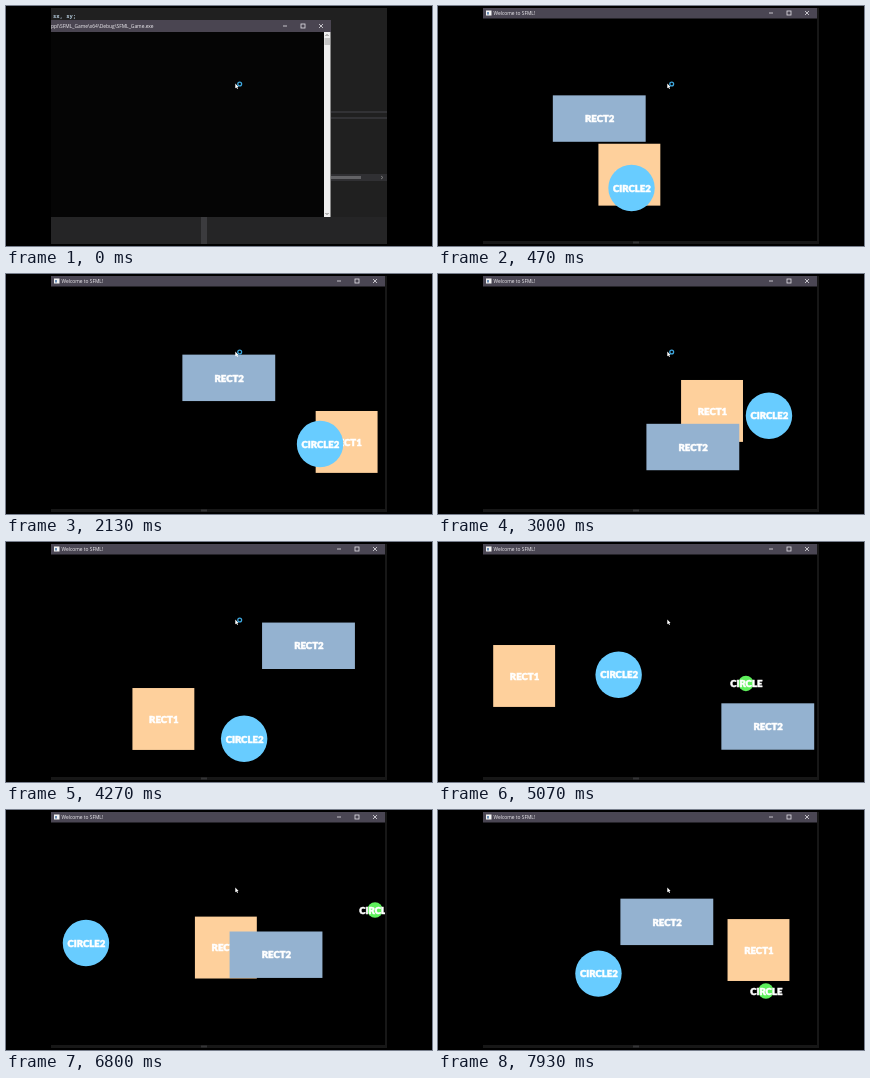
Write an HTML page with a canvas that moves like this. It is 426 by 240 pixels and loops after 8000 ms.

```html
<!DOCTYPE html>
<html lang="en">
<head>
<meta charset="utf-8">
<title>Bouncing shapes</title>
<style>
  html, body { margin: 0; width: 100%; height: 100%; overflow: hidden; background: #000; }
  canvas { display: block; width: 100vw; height: 100vh; }
</style>
</head>
<body>
<canvas id="stage" width="426" height="240"></canvas>
<script>
const ctx = document.getElementById('stage').getContext('2d');

const LOOP = 8000, STEP = LOOP / 120;
const WINDOW_OPENS = 0.19, BUSY_ENDS = 5;
const UNIT = 0.3095;                 // stage pixels per world unit
const WORLD = { x: 45, y: 12.5, w: 1073, h: 720 };

// Timing marks shared by the travel (unfolded x) and hop (phase) tracks.
const MARKS = [0, 1.2, 3, 4.267, 5.8, 6.8, 7.933];
const shapes = [
  { label: 'CIRCLE', round: true, w: 50, h: 50, color: '#5ef05c', apex: 422,
    travel: [228, 369, 580, 729, 912, 1024, 1157],
    hop: [-0.006, 0.538, 1.354, 1.929, 2.624, 3.077, 3.599] },
  { label: 'RECT1', w: 200, h: 200, color: '#fed09c', apex: 234,
    travel: [238, 585, 1106, 1483, 1924, 2211, 2536],
    hop: [-0.924, -0.204, 0.869, 1.606, 2.521, 3.139, 3.833] },
  { label: 'CIRCLE2', round: true, w: 150, h: 150, color: '#68ccff', apex: 256.5,
    travel: [296, 576, 997, 1297, 1653, 1884, 2144],
    hop: [-0.875, -0.184, 0.832, 1.551, 2.429, 3.031, 3.688] },
  { label: 'RECT2', w: 300, h: 150, color: '#94b2d0', apex: 351,
    travel: [170, 313, 528, 682, 851, 969, 1102],
    hop: [-1.088, -0.49, 0.4, 1.026, 1.804, 2.308, 2.861] }
];

function along(track, t) {
  let i = 1;
  while (i < MARKS.length - 1 && t > MARKS[i]) i++;
  const k = (t - MARKS[i - 1]) / (MARKS[i] - MARKS[i - 1]);
  return track[i - 1] + (track[i] - track[i - 1]) * k;
}

function fold(distance, span) {
  const d = distance % (2 * span);
  return d > span ? 2 * span - d : d;
}

function box(x, y, w, h, color) {
  ctx.fillStyle = color;
  ctx.fillRect(x, y, w, h);
}

function write(text, x, y, font, color, align = 'left') {
  ctx.font = font;
  ctx.fillStyle = color;
  ctx.textAlign = align;
  ctx.textBaseline = 'alphabetic';
  ctx.fillText(text, x, y);
}

function line(points, color, width = 0.8) {
  ctx.beginPath();
  points.forEach(([x, y]) => ctx.lineTo(x, y));
  ctx.strokeStyle = color;
  ctx.lineWidth = width;
  ctx.stroke();
}

function windowButtons(x, y) {
  const c = '#e4e2e8';
  line([[x - 2, y], [x + 2, y]], c);
  ctx.strokeRect(x + 16, y - 2, 4, 4);
  line([[x + 34, y - 2], [x + 38, y + 2]], c);
  line([[x + 38, y - 2], [x + 34, y + 2]], c);
}

function drawConsole() {
  box(45, 2, 336, 236, '#202020');
  write('sx, sy;', 47, 12, 'bold 5.5px "Noto Sans Mono", monospace', '#b4cbdc');

  box(325, 105.5, 56, 1, '#45454a');
  box(325, 111.5, 56, 1, '#45454a');
  box(325, 168, 56, 7, '#303033');
  box(325, 170, 30, 3, '#636366');
  line([[375, 170], [377, 171.5], [375, 173]], '#8a8a8a');
  box(45, 211, 336, 27, '#252526');
  box(195, 211, 6, 27, '#3b3b3e');

  box(45, 14, 280, 12, '#4a4551');
  ctx.save();
  ctx.beginPath();
  ctx.rect(45, 14, 225, 12);
  ctx.clip();
  write('ppl\\SFML_Game\\x64\\Debug\\SFML_Game.exe', 45, 22, '4.9px "Open Sans", sans-serif', '#f0eef2');
  ctx.restore();
  windowButtons(279, 20);

  box(45, 26, 273, 185, '#050505');
  box(318, 26, 6.5, 185, '#efefef');
  box(318.5, 32, 5.5, 7, '#c5c5c5');
  line([[319.5, 30], [321, 28.5], [322.5, 30]], '#555');
  line([[319.5, 207], [321, 208.5], [322.5, 207]], '#555');
}

function drawShape(shape, t) {
  const { label, round, w, h, color, apex, travel, hop } = shape;
  const phase = along(hop, t);
  const swing = phase - Math.round(phase);
  const x = WORLD.x + UNIT * fold(along(travel, t), WORLD.w - w);
  const y = WORLD.y + UNIT * (WORLD.h - h - apex * (1 - 4 * swing * swing));
  const pw = w * UNIT, ph = h * UNIT;
  if (round) {
    ctx.beginPath();
    ctx.arc(x + pw / 2, y + ph / 2, pw / 2, 0, Math.PI * 2);
    ctx.fillStyle = color;
    ctx.fill();
  } else {
    box(x, y, pw, ph, color);
  }
  const cx = x + pw / 2 + 0.4, base = y + ph / 2 + 3.7;
  write(label, cx, base, '900 9.6px Lato, sans-serif', '#fff', 'center');
  ctx.strokeStyle = '#fff';
  ctx.lineWidth = 0.5;
  ctx.strokeText(label, cx, base);
}

function drawGame(t) {
  box(45, 2, 336, 236, '#171717');
  box(195, 235.5, 6, 2, '#343436');
  box(45, 12, 334, 223, '#000');

  ctx.save();
  ctx.beginPath();
  ctx.rect(45, 12, 334, 223);
  ctx.clip();
  shapes.forEach(shape => drawShape(shape, t));
  ctx.restore();

  box(45, 2, 334, 10.5, '#4a4653');
  box(48, 4.5, 5.5, 5, '#f4f4f4');
  box(49, 6, 2, 2.5, '#6d8fb5');
  write('Welcome to SFML!', 55.5, 9, '4.9px "Open Sans", sans-serif', '#f0eef2');
  windowButtons(333, 7);
}

function drawCursor(busy) {
  ctx.beginPath();
  [[229.3, 77.5], [229.3, 82.3], [230.4, 81.4], [231.2, 83], [232, 82.6], [231.3, 81.1], [232.6, 81]]
    .forEach(([x, y]) => ctx.lineTo(x, y));
  ctx.closePath();
  ctx.fillStyle = '#fff';
  ctx.fill();
  if (!busy) return;
  ctx.beginPath();
  ctx.arc(233.7, 78, 1.9, 0, Math.PI * 2);
  ctx.strokeStyle = '#3fa9e0';
  ctx.lineWidth = 1.3;
  ctx.stroke();
}

const start = performance.now();

function render() {
  const elapsed = (performance.now() - start) % LOOP;
  const t = Math.floor((elapsed + 4) / STEP) % 120 * STEP / 1000;
  box(0, 0, 426, 240, '#000');
  if (t < WINDOW_OPENS) drawConsole();
  else drawGame(t);
  drawCursor(t < BUSY_ENDS);
  requestAnimationFrame(render);
}
render();
</script>
</body>
</html>
```
